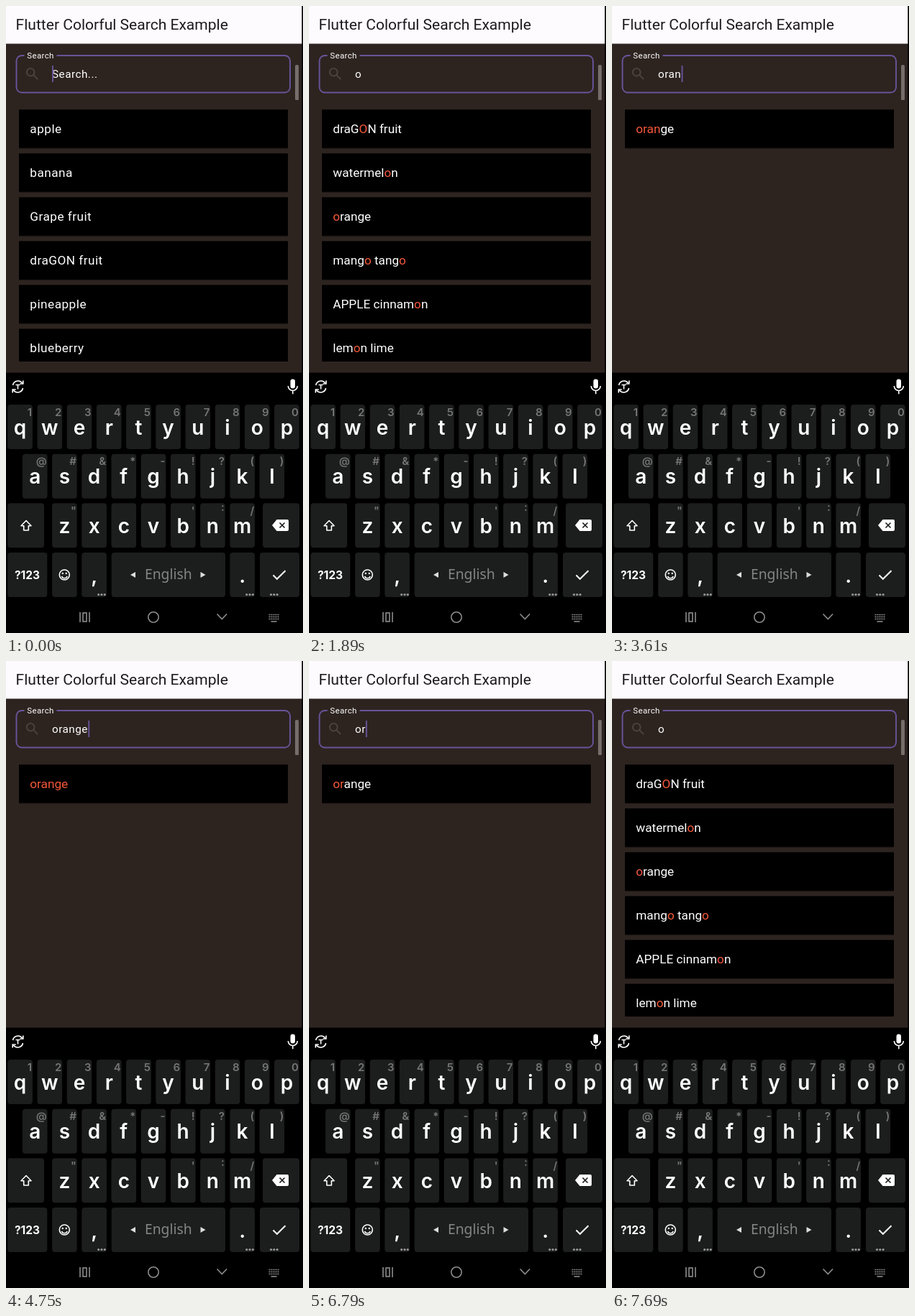
Write an HTML page that moves like this. It is 413 by 873 pixels and loops after 8 s.

```html
<!DOCTYPE html>
<html lang="en">
<head>
<meta charset="utf-8">
<title>Colorful search</title>
<style>
  html, body { margin: 0; width: 100%; height: 100%; overflow: hidden; background: #000; }
  svg { display: block; width: 413px; height: 873px; }
  text { white-space: pre; font-family: Roboto, sans-serif; fill: #fff; }
  .title { font-size: 21.05px; fill: #1c1b1f; }
  .label { font-size: 11.5px; letter-spacing: .36px; }
  .field { font-size: 15.3px; letter-spacing: .48px; }
  .item { font-size: 17.2px; }
  .plain { letter-spacing: .48px; }
  .match { fill: #f4573a; }
  .key { fill: #1c1d1d; }
  .letter { font: 600 28px Inter, sans-serif; text-anchor: middle; }
  .hint { font: 600 15px Inter, sans-serif; text-anchor: end; fill: #757575; }
  .mode { font: 700 15.5px Inter, sans-serif; text-anchor: middle; }
  .language { font: 19.3px "Noto Sans", sans-serif; text-anchor: middle; fill: #858585; }
  .line { fill: none; stroke: #fff; stroke-width: 1.6; }
  .nav { fill: none; stroke: #8c8c8c; stroke-width: 1.6; }
</style>
</head>
<body>
<svg viewBox="0 0 413 873">
  <defs><clipPath id="viewport"><rect y="140" width="413" height="355"/></clipPath></defs>

  <rect width="411.3" height="511" fill="#2d2420"/>
  <rect width="411.3" height="52.5" fill="#fefbff"/>
  <text class="title" x="13.6" y="33">Flutter Colorful Search Example</text>

  <path d="M25.5 69H22a7.5 7.5 0 0 0-7.5 7.5v36.5a7.5 7.5 0 0 0 7.5 7.5H387.5a7.5 7.5 0 0 0 7.5-7.5V76.500a7.5 7.500 0 0 0-7.5-7.5H70.500"
        fill="none" stroke="#68549a" stroke-width="1.9"/>
  <text class="label" x="29.3" y="73">Search</text>
  <g fill="none" stroke="#4c4441" stroke-width="1.9">
    <circle cx="34.2" cy="92.2" r="5.3"/><path d="M38.200 96.200l6 6"/>
  </g>
  <text class="field" id="query" x="64" y="99.7"></text>
  <rect id="cursor" y="83" width="1.9" height="23" fill="#68549a"/>
  <rect x="402" y="82" width="5" height="49" rx="1.5" fill="#746d6a"/>
  <g id="list" clip-path="url(#viewport)"></g>

  <rect y="510.5" width="413" height="363"/>
  <g id="keys"></g>

  <!-- toolbar: translate and microphone -->
  <g class="line" stroke-width="1.4">
    <path d="M9.500 528a7.300 7.300 0 0 1 13-3M23.500 532a7.300 7.300 0 0 1-13 3"/>
    <path d="M23.800 521.500v4.500h-4.500M9.200 538.500V534h4.500"/>
    <path d="M13.500 527.500h6M16.500 527.500v6"/>
  </g>
  <rect x="395.500" y="519.500" width="6.500" height="13" rx="3.250" fill="#fff"/>
  <path class="line" d="M392.300 529a6.500 6.500 0 0 0 13 0M398.800 535.500v4.800"/>

  <!-- special keys -->
  <path class="line" d="M28 716.500l-7 7.200h3.700v6.300h6.600v-6.300H35z" stroke-linejoin="round"/>
  <path d="M376.500 715H391a2 2 0 0 1 2 2v12a2 2 0 0 1-2 2H376.500L370 723z" fill="#fff"/>
  <path d="M380.500 719.500l7 7m0-7l-7 7" stroke="#1c1d1d" stroke-width="1.700"/>
  <text class="mode" x="29.500" y="797.500">?123</text>
  <circle class="line" cx="81.300" cy="792" r="7"/>
  <path class="line" d="M77.500 794a4 4 0 0 0 7.600 0"/>
  <circle cx="78.800" cy="790" r="1.200" fill="#fff"/><circle cx="83.800" cy="790" r="1.200" fill="#fff"/>
  <path d="M180 788v8l-7-4zM270.500 788v8l7-4z" fill="#ddd"/>
  <text class="language" x="225.800" y="798">English</text>
  <path class="line" d="M371.500 792.500l5.300 5.300L388.500 786.200" style="stroke-width:2"/>

  <!-- navigation bar -->
  <g class="nav">
    <path d="M103 844v14M116 844v14"/><rect x="107" y="845" width="5" height="12"/>
    <circle cx="205" cy="851" r="7.200"/>
    <path d="M293.500 846.500l6.800 7 6.800-7"/>
    <path d="M365.500 847.500h14M365.500 850.500h14M365.500 853.500h14" stroke-dasharray="2 1"/>
    <path d="M368.500 857h8"/>
  </g>
</svg>
<script>
const DURATION = 8000;
const FRUITS = ["apple", "banana", "Grape fruit", "draGON fruit", "pineapple", "blueberry",
  "watermelon", "orange", "mango tango", "APPLE cinnamon", "lemon lime"];

// [start in ms, letters of "orange" typed, cursor visible]
const STEPS = [
  [0, 0, 1], [490, 1, 1], [990, 1, 0], [1410, 1, 1], [1890, 1, 0],
  [2300, 2, 1], [2630, 2, 0], [3050, 3, 1], [3540, 3, 0], [3610, 4, 1], [4100, 4, 0],
  [4270, 5, 1], [4680, 5, 0], [4750, 6, 1], [5170, 6, 0],
  [5400, 5, 1], [5890, 5, 0], [5980, 4, 1], [6380, 3, 1], [6790, 2, 1], [7290, 1, 1], [7690, 1, 0]
];
const CURSOR_X = [64, 73.2, 78.9, 87.7, 96.6, 105.7, 114.3];

const byId = id => document.getElementById(id);

function buildKeyboard() {
  const PITCH = 41.2;
  let markup = "";
  const key = (x, y, width) =>
    markup += `<rect class="key" x="${x}" y="${y}" width="${width}" height="62" rx="4"/>`;
  const label = (kind, x, y, text) =>
    markup += `<text class="${kind}" x="${x}" y="${y}">${text.replace("&", "&amp;")}</text>`;

  function row(letters, hints, firstX, y) {
    [...letters].forEach((letter, i) => {
      const center = firstX + i * PITCH, hint = hints[i];
      key(center - 17.3, y, 34.6);
      label("letter", center, y + 41.5, letter);
      if (hint !== " ") label("hint", center + 16.5, y + (hint === ":" ? 11 : 15.5), hint);
    });
  }
  row("qwertyuiop", "1234567890", 19.6, 555);
  row("asdfghjkl", "@#&*-!?()", 40.2, 623.8);
  row("zxcvbnm", "\"   ':/", 81.4, 692.3);
  row(",", " ", 122.6, 761);
  row(".", " ", 328.6, 761);

  key(2.3, 692.3, 50.7);
  key(357, 692.3, 51);
  key(2.3, 761, 55);
  key(64.1, 761, 34.6);
  key(146.7, 761, 158.3);
  key(353, 761, 55);
  for (const x of [128.7, 334.7, 368.5])
    for (let i = 0; i < 3; i++)
      markup += `<circle cx="${x + i * 4.3}" cy="819.5" r="1.6" fill="#999"/>`;
  byId("keys").innerHTML = markup;
}

function drawList(query) {
  const highlight = text => query
    ? text.replace(new RegExp(query, "gi"), '<tspan class="match">$&</tspan>') : text;
  byId("list").innerHTML = FRUITS
    .filter(name => name.toLowerCase().includes(query))
    .slice(0, 6)
    .map((name, i) => {
      const y = 144.2 + i * 61.05;
      return `<rect x="18" y="${y + 1}" width="374" height="53.6" rx="1" fill-opacity=".4"/>
        <rect x="18" y="${y}" width="374" height="53.4"/>
        <text class="item ${query ? "" : "plain"}" x="33.3" y="${y + 32.6}">${highlight(name)}</text>`;
    }).join("");
}

let shown;
function render(now) {
  const time = now % DURATION;
  const step = STEPS.findLast(([start]) => start <= time);
  if (step !== shown) {
    const [, typed, cursorOn] = shown = step;
    const query = "orange".slice(0, typed);
    byId("query").textContent = query || "Search...";
    byId("cursor").setAttribute("x", CURSOR_X[typed]);
    byId("cursor").setAttribute("opacity", cursorOn);
    drawList(query);
  }
}

buildKeyboard();
const begin = performance.now();
function tick() {
  render(performance.now() - begin);
  requestAnimationFrame(tick);
}
tick();
</script>
</body>
</html>
```
